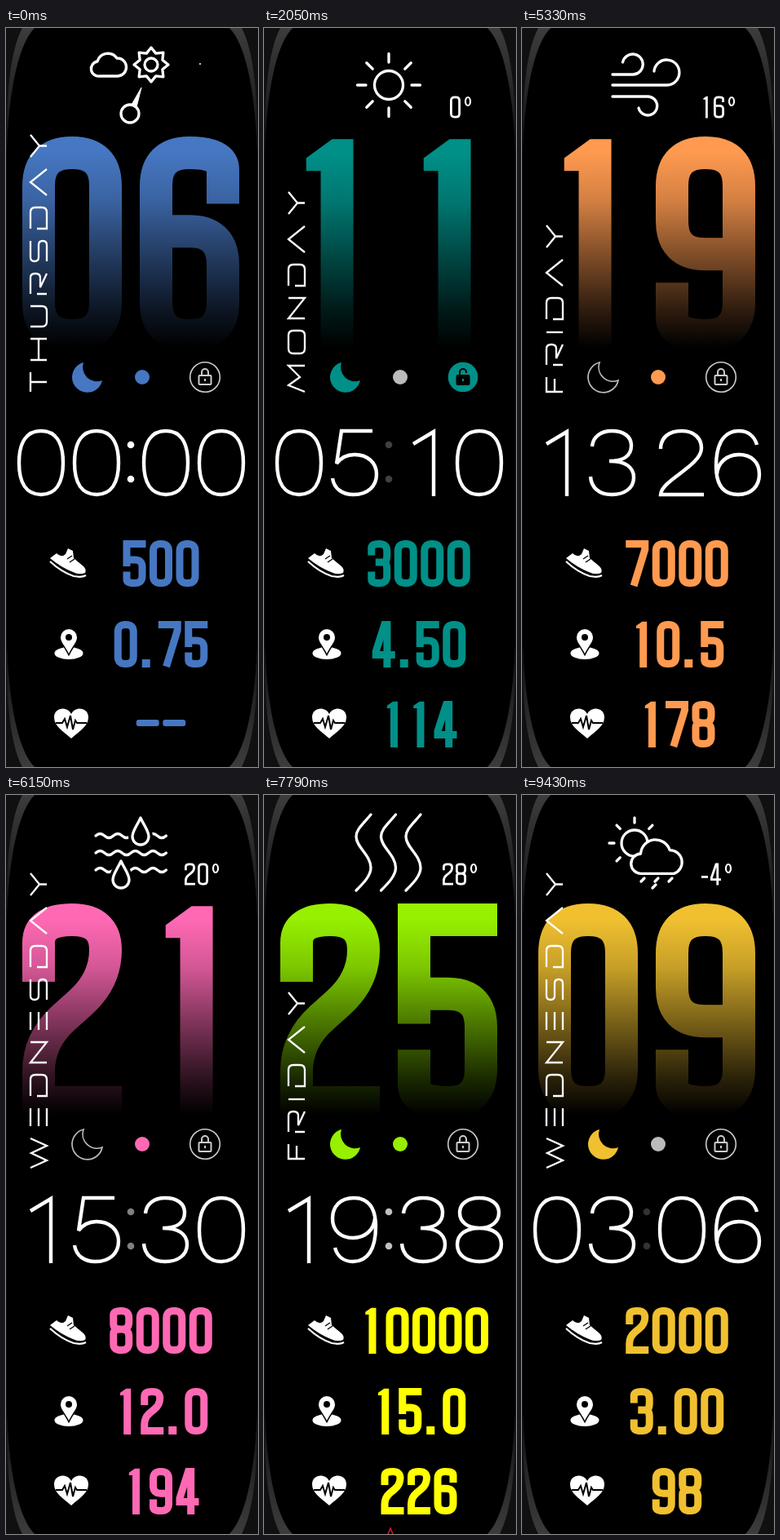
Write an HTML page that moves like this. It is 309 px wide and 906 px high and loops after 9840 ms.

```html
<!DOCTYPE html>
<html lang="en">
<head>
<meta charset="utf-8">
<title>Fitness band face</title>
<style>
html, body { margin: 0; width: 100%; height: 100%; overflow: hidden; background: #000; }
svg { display: block; width: 309px; height: 906px; }
.line { fill: none; stroke: #fff; }
.sky { fill: none; stroke: #fff; stroke-width: 3.3; stroke-linecap: round; stroke-linejoin: round; }
</style>
</head>
<body>
<svg viewBox="0 0 309 906" role="img" aria-label="Fitness band face">
  <defs>
    <linearGradient id="fade" x1="0" y1="0" x2="0" y2="1">
      <stop offset=".08" stop-color="#000" stop-opacity="0"/>
      <stop offset=".3" stop-color="#000" stop-opacity=".17"/>
      <stop offset=".55" stop-color="#000" stop-opacity=".5"/>
      <stop offset=".8" stop-color="#000" stop-opacity=".82"/>
      <stop offset=".97" stop-color="#000"/>
    </linearGradient>
    <linearGradient id="shine" x1="0" y1="0" x2="0" y2="1">
      <stop offset="0" stop-color="#3c3c3c"/>
      <stop offset=".5" stop-color="#262626"/>
      <stop offset="1" stop-color="#0c0c0c"/>
    </linearGradient>
    <g id="corner">
      <path fill="#101010" d="M0 0H35C17 18 4 68 1 150H0Z"/>
      <path fill="url(#shine)" d="M35 0C17 18 4 68 1 150C0 90 4 30 20 0Z"/>
    </g>
  </defs>
  <rect width="309" height="906"/>
  <path d="M.5 140V770M308.5 140V770" stroke="#0c0c0c"/>
  <use href="#corner"/>
  <use href="#corner" transform="matrix(-1 0 0 1 309 0)"/>
  <use href="#corner" transform="matrix(1 0 0 -1 0 906)"/>
  <use href="#corner" transform="matrix(-1 0 0 -1 309 906)"/>
  <g id="face"></g>
  <g fill="#fff">
    <path d="M54 650L62 644Q68 650 73 645L76 638L82 641L83 650L95 660Q99 664 97 668Q90 671 82 667Q67 661 54 650Z"/>
    <path class="line" stroke-width="2.2" d="M54 654Q68 667 83 672Q93 674 98 671"/>
    <path stroke="#000" stroke-width="1.4" d="M75 651L81 647M78 655L84 651"/>
    <ellipse cx="77" cy="766.5" rx="17.5" ry="7.5"/>
    <path stroke="#000" stroke-width="3" paint-order="stroke" d="M77 767C72 757 67 753 67 747A10 10 0 0 1 87 747C87 753 82 757 77 767Z"/>
    <circle cx="77" cy="747" r="4" fill="#000"/>
    <path d="M80 871C70 862 59 856 59 845C59 833 75 831 80 841C85 831 101 833 101 845C101 856 90 862 80 871Z"/>
    <path fill="none" stroke="#000" stroke-width="2" d="M61 852H69L72 847L75 857L79 843L82 860L85 849L87 852H99"/>
  </g>
</svg>
<script>
const STEP = 410, STEPS = 24, STATES = 20;

// Condensed digits as centre lines in a unit box; "!" keeps a corner sharp.
const BOLD = {
  0: ['0,.5 0,0 1,0 1,1 0,1 0,.5'],
  1: [],
  2: ['0,.25 0,0 1,0 1,.33 0,.66 0,1! 1,1'],
  3: ['0,.2 0,0 1,0 1,.47 .5,.47', '.5,.47 1,.47 1,1 0,1 0,.8'],
  4: ['.72,1 .72,0! .55,0! 0,.68! 0,.77! 1,.77'],
  5: ['1,0 0,0! 0,.48', '0,.405 1,.405 1,1 0,1 0,.8'],
  6: ['1,.19 1,0 0,0 0,1 1,1 1,.43 0,.43'],
  7: ['0,0 1,0! 1,.14! .35,.98'],
  8: ['0,.2 0,0 1,0 1,.47 0,.47 0,.2', '0,.7 0,.47 1,.47 1,1 0,1 0,.7'],
  9: ['0,.8 0,1 1,1 1,0 0,0 0,.555 1,.555']
};

// Light clock digits in a 58 x 82 box.
const LIGHT = [
  'M2 41C2 16 11 2 29 2S56 16 56 41 47 80 29 80 2 66 2 41Z',
  'M16 18L41 3V82',
  'M3 24C3 10 13 2 29 2 44 2 53 11 53 23 53 45 4 62 3 80H56',
  'M4 21C5 9 15 2 28 2 43 2 52 9 52 20 52 32 43 39 25 39 44 39 55 46 55 59 55 72 44 80 28 80 13 80 3 72 2 58',
  'M42 82V3L3 57H58',
  'M51 2H13L7 42C13 34 20 31 29 31 45 31 56 41 56 55 56 70 45 80 28 80 14 80 4 73 2 60',
  'M53 19C50 8 42 2 31 2 13 2 3 17 3 45 3 68 12 80 30 80 46 80 56 70 56 55 56 40 46 31 31 31 16 31 5 41 4 55',
  'M3 3H55C38 25 26 50 22 82',
  'M29 39C14 39 5 31 5 20 5 9 15 2 29 2S53 9 53 20 44 39 29 39C12 39 2 47 2 59 2 72 13 80 29 80S56 72 56 59 46 39 29 39Z',
  'M5 63C8 74 16 80 27 80 45 80 55 65 55 37 55 14 46 2 28 2 12 2 2 12 2 27 2 42 12 51 27 51 42 51 53 41 54 27'
];

// Weekday letters: width and outline, 20 high.
const LETTERS = {
  A: [32, 'M0 20L16 0L32 20'],
  D: [26, 'M0 0H20Q26 0 26 6V14Q26 20 20 20H0V8'],
  E: [22, 'M0 0H22M0 10H22M0 20H22'],
  F: [18, 'M18 0H0V20M0 10H16'],
  H: [26, 'M0 0V20M26 0V20M0 10H26'],
  I: [1, 'M0 0V20'],
  M: [32, 'M0 20L8 0L18 14L32 0V20'],
  N: [25, 'M0 20V0L25 20V0'],
  O: [28, 'M6 0H22Q28 0 28 6V14Q28 20 22 20H6Q0 20 0 14V6Q0 0 6 0Z'],
  R: [25, 'M0 20V8M0 0H20Q25 0 25 6T20 12H8L25 20'],
  S: [25, 'M25 0H5Q0 0 0 5T5 10H20Q25 10 25 15T20 20H0'],
  T: [24, 'M0 0H24M12 0V20'],
  U: [25, 'M0 0V14Q0 20 6 20H19Q25 20 25 14V0'],
  W: [36, 'M0 0L9 20L18 1L27 20L36 0'],
  Y: [27, 'M0 0L13.5 11L27 0M13.5 11V20']
};

const DAYS = ['THURSDAY', 'FRIDAY', 'SATURDAY', 'WEDNESDAY', 'TUESDAY', 'MONDAY'];
const COLORS = ['#4677c2', '#4677c2', '#8a6fc0', '#f0c030', '#7fae60', '#009088', '#2f9f9f',
  '#4f9f70', '#5f9550', '#6b8e2b', '#8f9a30', '#c0a040', '#e09848', '#ff9a50', '#ff8080',
  '#ff69b4', '#e860c8', '#d8a070', '#c0d040', '#96f000'];
const COLON = [1, .8, .5, .2, 0, .25, .5, .8, 1, 1, .8, .5, .2, 0, .25, .5, .8, 1, 1, .75];

const path = (d, attrs = '') => `<path d="${d}" ${attrs}/>`;
const group = (x, y, body, attrs = '') => `<g transform="translate(${x} ${y})" ${attrs}>${body}</g>`;

function trace(line, w, h, s, r) {
  const pts = line.split(' ').map(p => {
    const [u, v] = p.split(',').map(parseFloat);
    return { x: s / 2 + u * (w - s), y: s / 2 + v * (h - s), sharp: p.endsWith('!') };
  });
  const toward = (a, b) => {
    const len = Math.hypot(b.x - a.x, b.y - a.y), k = Math.min(r, len / 2) / len;
    return `${a.x + (b.x - a.x) * k} ${a.y + (b.y - a.y) * k}`;
  };
  return pts.map((p, i) => {
    if (!i) return `M${p.x} ${p.y}`;
    if (p.sharp || i === pts.length - 1) return `L${p.x} ${p.y}`;
    return `L${toward(p, pts[i - 1])}Q${p.x} ${p.y} ${toward(p, pts[i + 1])}`;
  }).join('');
}

function digit(n, x, y, w, h, s, color) {
  let body;
  if (n == 1) {
    const c = w * .57, l = c - s / 2, r = c + s / 2, top = h * .012, tip = w * .26;
    body = path(`M${r} ${top}V${h}H${l}V${h * .16}H${tip}V${h * .1}L${l + s * .35} ${top}Z`, `fill="${color}"`);
  } else {
    const d = BOLD[n].map(line => trace(line, w, h, s, h * .155)).join('');
    body = path(d, `fill="none" stroke="${color}" stroke-width="${s}" stroke-linecap="square"`);
  }
  return group(x, y, body);
}

function stat(text, y, color) {
  const advance = c => c === '.' ? 21.5 : 32.5;
  const total = [...text].reduce((sum, c) => sum + advance(c), -4.5);
  let x = (text.length > 4 ? 196 : 190) - total / 2, out = '';
  for (const c of text) {
    if (c === '.') out += `<rect x="${x + 1.5}" y="${y + 47}" width="10" height="10" fill="${color}"/>`;
    else if (c === '-') out += `<rect x="${x}" y="${y + 23}" width="28" height="8" rx="3" fill="${color}"/>`;
    else out += digit(c, x, y, 28, 57, 9, color);
    x += advance(c);
  }
  return out;
}

function temperature(deg) {
  const text = String(deg);
  let x = text.length > 2 ? 210 : text.length > 1 ? 219 : 228, out = '';
  for (const c of text) {
    if (c === '-') {
      out += `<rect x="${x + 1}" y="99" width="8" height="2.8" fill="#fff"/>`;
      x += 12;
    } else {
      out += digit(c, x, 83.5, 13, 27, 2.8, '#fff');
      x += 16;
    }
  }
  return out + `<ellipse class="line" cx="${x + 6}" cy="90" rx="3" ry="5" stroke-width="2.2"/>`;
}

function weekday(day) {
  let x = 0, d = '';
  for (const c of day) {
    const [w, outline] = LETTERS[c];
    d += `<path transform="translate(${x} 0)" d="${outline}"/>`;
    x += w + 15;
  }
  const start = day[0] === 'W' ? 457 : 446;
  return `<g transform="translate(30 ${start}) rotate(-90)" class="line" stroke-width="2.3">${d}</g>`;
}

const clock = (text, level) =>
  [...text].map((c, i) => group([14, 82, 167, 235][i], 492, path(LIGHT[c]), 'class="line" stroke-width="4.4"')).join('') +
  [511, 553].map(y => `<circle cx="153" cy="${y}" r="4.3" fill="#fff" opacity="${level}"/>`).join('');

// Weather
const circle = (x, y, r) => `<circle cx="${x}" cy="${y}" r="${r}"/>`;

function rays(x, y, a, b) {
  let d = '';
  for (let i = 0; i < 8; i++) {
    const c = Math.cos(i * Math.PI / 4), s = Math.sin(i * Math.PI / 4);
    d += `M${x + a * c} ${y + a * s}L${x + b * c} ${y + b * s}`;
  }
  return path(d);
}

function star(x, y, outer, inner) {
  const pts = [];
  for (let i = 0; i < 16; i++) {
    const r = i % 2 ? inner : outer, a = i * Math.PI / 8;
    pts.push(`${x + r * Math.cos(a)} ${y + r * Math.sin(a)}`);
  }
  return path(`M${pts.join('L')}Z`);
}

const CLOUD = path('M128 82A14 14 0 0 1 127 54A21 21 0 0 1 168 49A17 17 0 0 1 174 82Z', 'fill="#000"');
const dashes = (xs, y, size = 6) => path(xs.map(x => `M${x} ${y}l${-size} ${size}`).join(''));

function drop(x, y) {
  const d = 'M0 0C4 9 10 16 10 23A10 10 0 0 1 -10 23C-10 16 -4 9 0 0Z';
  return group(x, y, path(d, 'fill="#000" stroke="#000" stroke-width="10"') + path(d));
}

const SKY = {
  mixed: () => path('M115 59A9 9 0 0 1 112 41A13.5 13.5 0 0 1 136 37A11 11 0 0 1 137 59Z') +
    star(178, 45, 21, 15) + circle(178, 45, 8) + circle(152, 105, 11) + path('M154 94L166 73L160 97Z', 'fill="#fff" stroke-width="1"'),
  sun: () => circle(153, 70, 17.5) + rays(153, 70, 28, 38.5),
  cloud: () => CLOUD,
  rain: () => CLOUD + dashes([130, 144, 158, 172], 89) + dashes([122, 136, 150, 164], 99),
  snow: () => CLOUD + path('M128 94h.1M146 94h.1M164 94h.1M137 104h.1M155 104h.1', 'stroke-width="5"'),
  storm: () => CLOUD + path('M156 74L144 91H155L147 107'),
  showers: () => circle(138, 59, 16) + rays(138, 59, 25, 31) +
    group(35, 25, `<g transform="scale(.87)" stroke-width="3.8">${CLOUD}</g>`) +
    dashes([150, 167, 184], 102, 4) + dashes([164], 110, 4),
  wind: () => path('M111 57H136A12.5 12.5 0 1 0 123.5 42M111 70H178A15.5 15.5 0 1 0 162 53M111 84H155A11.5 11.5 0 1 1 143 98'),
  humid: () => path([50, 71, 92].map(y => `M110 ${y}q5.4 -5 10.8 0${'t10.8 0'.repeat(7)}`).join('')) + drop(165, 28) + drop(141, 81),
  heat: () => [0, 30.5, 61].map(x =>
    group(x, 0, path('M131 24C121 36 113 42 113 51C113 64 131 74 131 89C131 99 122 108 113 117'))).join('')
};
const WEATHER = ['mixed', 'mixed', 'snow', 'showers', 'snow', 'sun', 'sun', 'cloud', 'cloud', 'rain',
  'storm', 'showers', 'wind', 'wind', 'wind', 'humid', 'sun', 'sun', 'heat', 'heat'];

function toggles(i, color) {
  const night = i < 7 || i > 17, linked = i < 3 || i > 11, open = i > 3 && i < 12;
  const moon = path('M95 410A18.7 18.7 0 1 0 118 432A17.5 17.5 0 0 1 95 410Z',
    night ? `fill="${color}"` : 'fill="none" stroke="#bbb" stroke-width="1.7"');
  const link = `<circle cx="167" cy="428" r="9" fill="${linked ? color : '#bbb'}"/>`;
  const ink = open ? '#000' : '#ccc', disc = i > 7 ? '#ff0' : color;
  const lock = `<circle cx="244" cy="428" r="18.3" ${open ? `fill="${disc}"` : 'fill="none" stroke="#ccc" stroke-width="1.6"'}/>` +
    `<rect x="236.5" y="426" width="15" height="11" rx="1" fill="${open ? ink : 'none'}" stroke="${ink}" stroke-width="2"/>` +
    path(`M240 426V422a4 4 0 0 1 8 0V${open ? 423 : 426}`, `fill="none" stroke="${ink}" stroke-width="2"`) +
    path('M244 430v3', `stroke="${open ? disc : ink}" stroke-width="2"`);
  return moon + link + lock;
}

const pad = n => String(n).padStart(2, '0');

function face(i) {
  const color = COLORS[i], stats = i === 19 ? '#ff0' : color;
  const [a, b] = pad(i + 6);
  const km = .75 * (i + 1);
  return digit(a, 20, 133, 122, 264, 40, color) + digit(b, 164, 133, 122, 264, 40, color) +
    '<rect x="15" y="130" width="280" height="270" fill="url(#fade)"/>' +
    `<g class="sky">${SKY[WEATHER[i]]()}</g>` +
    (i ? temperature(2 * i - 10) : '<circle cx="238" cy="44" r="1" fill="#fff"/>') +
    weekday(DAYS[i % 6]) + toggles(i, color) +
    clock(pad(i) + pad(2 * i), COLON[i]) +
    stat(String(500 * (i + 1)), 628, stats) +
    stat(km.toFixed(km < 10 ? 2 : 1), 727, stats) +
    stat(i < 2 ? '--' : String(74 + 8 * i), 825, stats) +
    (i === 19 ? path('M152 906L155 899L158 906', 'fill="none" stroke="#c22" stroke-width="1.5"') : '');
}

const layer = document.getElementById('face');
let shown = -1;

function tick() {
  const step = Math.floor(performance.now() / STEP) % STEPS;
  if (step !== shown) {
    shown = step;
    layer.innerHTML = face(step % STATES);
  }
  requestAnimationFrame(tick);
}
tick();
</script>
</body>
</html>
```
